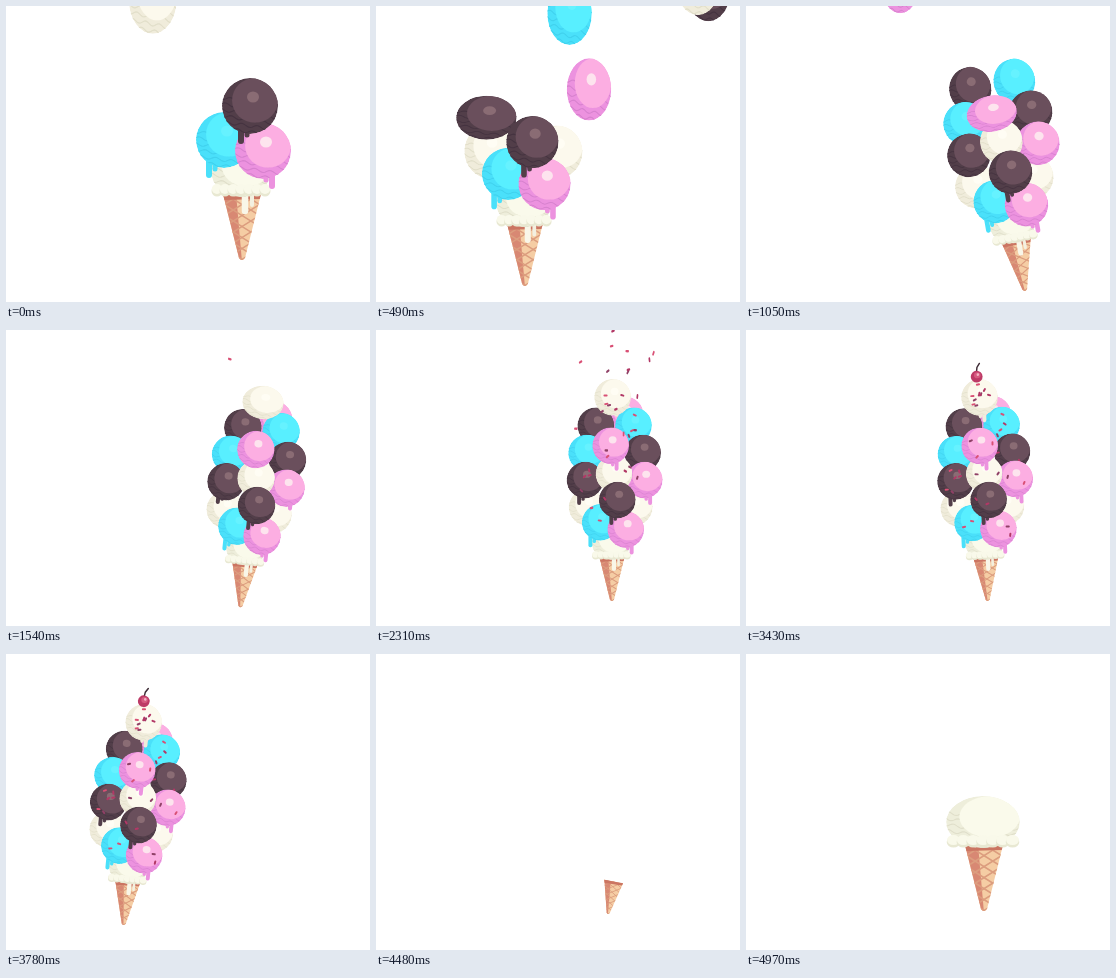
An HTML page with a canvas for the animation above (5.04 s loop, 364 by 296 pixels).

```html
<!DOCTYPE html>
<html lang="en">
<head>
<meta charset="utf-8">
<title>Ice cream tower</title>
<style>
html, body { margin: 0; width: 100%; height: 100%; overflow: hidden; background: #fff; }
canvas { display: block; }
</style>
</head>
<body>
<canvas id="stage" width="364" height="296"></canvas>
<script>
const ctx = document.getElementById('stage').getContext('2d');
const LOOP = 5040, STEP = 70, R = 28, TAU = Math.PI * 2, DEG = Math.PI / 180;
const { sin, cos, exp, min, max } = Math;

const FLAVOUR = {
  brown: { shade: '#523e49', light: '#6a4f5c', line: '#453340', glow: '#8a6c74', drip: -9 },
  pink: { shade: '#ec92df', light: '#fcaee2', line: '#d882cf', glow: '#fde4ee', drip: 9 },
  blue: { shade: '#4ae0fa', light: '#58efff', line: '#40d2ee', glow: '#66f2ff', drip: -15 },
  cream: { shade: '#f0ecdb', light: '#fcf9ed', line: '#e2dfca', glow: '#fffdf4', drip: 6 }
};

const ramp = (t, from, to) => min(max((t - from) / (to - from), 0), 1);
const ease = (t, from, to) => { const u = ramp(t, from, to); return u * u * (3 - 2 * u); };

// The cone sways on a balance, then leans back and dashes off to the left
function towerPose(t) {
  const turn = TAU * (t < 695 ? (t / 695) ** 2 / 2 : .5 + (t - 695) / 850);
  const calm = 1 - ease(t, 1300, 1800), dash = max(t - 3500, 0) / 420;
  const lean = -11.5 * cos(turn) * ease(t, 0, 1100) * calm;
  return {
    x: 236 - 87 * sin(turn) * calm + 6 * ease(t, 2900, 3500) - 280 * dash * dash,
    y: 254 + 31 * ease(t, 0, 660) - 14 * ease(t, 1300, 1750),
    s: 1 - .345 * ease(t, 0, 1750),
    r: (lean - 2.5 * ease(t, 2900, 3430) + 8 * ease(t, 3500, 3780)) * DEG
  };
}

// A small cone pops up and dips when the first scoop lands
function entryPose(t) {
  const u = ramp(t, 4480, 4620), back = 1 - u;
  return {
    x: 238 - 6 * back,
    y: 254 + 6 * back + 10 * sin(Math.PI * ramp(t, 4880, 4980)),
    s: 1 - .5 * back + .3 * u * back,
    r: 10 * back * DEG
  };
}

// Scoops from back to front, placed relative to the cone tip
const scoops = [];
const add = (kind, x, y, land) =>
  scoops.push({ ...FLAVOUR[kind], x, y, land, speed: .45 });
const sides = [['cream', 'cream'], ['brown', 'pink'], ['blue', 'brown'], ['brown', 'blue']];

add('pink', 20, -284, 1270);
for (const k of [0, 3, 2, 1]) for (const side of [1, 0]) {
  const half = 36 + 15 * k - 5.8 * k * k;
  add(sides[k][side], 4 - 6 * !k + (side ? half : -half), -143 - 41.5 * k, 300 + 88 * (2 * k + side));
}
['cream', 'pink'].forEach((kind, i) => add(kind, 3 - 5 * i, -194 - 43 * i, 810 + 230 * i));
const TOP = scoops.length, FRONT = TOP + 1;
add('cream', 1, -311, 1500);
add('blue', -18, -120, -9999);
add('pink', 21, -109, -9999);
add('brown', 8, -154, -9999);

const cherry = { x: -2, y: -343, land: 2980, speed: .45 };

let seed = 11;
const rand = () => (seed = seed * 16807 % 2147483647) / 2147483647;
const sprinkles = Array.from({ length: 40 }, (_, i) => {
  const host = i % 4 ? Math.floor(rand() * scoops.length) : TOP;
  const a = rand() * TAU, d = Math.sqrt(rand()) * 22;
  const dx = cos(a) * d, dy = sin(a) * d - 3;
  return {
    host, dx, dy, x: scoops[host].x + dx, y: scoops[host].y + dy,
    land: 2030 + rand() * 720, speed: .32, turn: rand() * TAU,
    color: ['#b23866', '#d95075', '#8f4066'][i % 3]
  };
});

function frame(x, y, r, sx, sy = sx) {
  ctx.setTransform(sx * cos(r), sx * sin(r), -sy * sin(r), sy * cos(r), x, y);
}

// Moves the pen to a part that drops straight down, then rides on the tower
function ride(part, t) {
  const d = t - part.land, { s, r } = towerPose(t), p = towerPose(max(t, part.land));
  const x = p.x + p.s * (part.x * cos(p.r) - part.y * sin(p.r));
  const y = p.y + p.s * (part.x * sin(p.r) + part.y * cos(p.r));
  if (d < 0) {
    frame(x, y + part.speed * d, 0, s * .85, s * 1.19);
  } else {
    const q = .18 * exp(-d / 130) * cos(d / 60);
    frame(x, y + q * R * s, r, s * (1 + q), s * (1 - q));
  }
}

function oval(x, y, rx, ry, color) {
  ctx.fillStyle = color;
  ctx.beginPath();
  ctx.ellipse(x, y, rx, ry, 0, 0, TAU);
  ctx.fill();
}

function line(color, width, ...pts) {
  ctx.strokeStyle = color;
  ctx.lineWidth = width;
  ctx.lineCap = 'round';
  ctx.beginPath();
  pts.forEach(([x, y]) => ctx.lineTo(x, y));
  ctx.stroke();
}

function poly(color, ...pts) {
  ctx.fillStyle = color;
  ctx.beginPath();
  pts.forEach(([x, y]) => ctx.lineTo(x, y));
  ctx.fill();
}

// Shaded ball with rippled dark side
function ball(x, y, rx, ry, c) {
  ctx.save();
  ctx.beginPath();
  ctx.ellipse(x, y, rx, ry, 0, 0, TAU);
  ctx.clip();
  oval(x, y, rx, ry, c.shade);
  for (let j = 0; j < 6; j++) {
    const pts = [];
    for (let i = -rx; i <= rx; i += 2)
      pts.push([x + i, y - 4 + j * 6 + i * .15 + 1.5 * sin(i / 2.5 + j * 2)]);
    line(c.line, 1.1, ...pts);
  }
  oval(x + rx * .18, y - ry * .2, rx * .82, ry * .8, c.light);
  ctx.restore();
}

function drawSprinkle(k, x, y) {
  const c = cos(k.turn) * 1.7, s = sin(k.turn) * 1.7;
  line(k.color, 3, [x - c, y - s], [x + c, y + s]);
}

function drawScoop(o, t) {
  ride(o, t);
  const grow = ramp(t, o.land + 250, o.land + 1250);
  if (grow) {
    line(o.shade, 6, [o.drip, 16], [o.drip, 16 + 19 * grow]);
    const x = o.drip - 6 * Math.sign(o.drip);
    line(o.shade, 5, [x, 16], [x, 16 + 13 * grow]);
  }
  ball(0, 0, R, R, o);
  oval(3, -9, 6, 5.5, o.glow);
}

function drawCone() {
  ctx.save();
  ctx.beginPath();
  ctx.moveTo(-19, -66);
  ctx.lineTo(19, -66);
  ctx.lineTo(3, -2);
  ctx.quadraticCurveTo(0, 2, -3, -2);
  ctx.clip();
  poly('#f5cda4', [-20, -67], [20, -67], [4, 2], [-4, 2]);
  poly('#d88873', [-20, -67], [-6, -67], [0, 2], [-4, 2]);
  for (let y = -90; y < 20; y += 11) {
    line('#dc9d7e', 1.6, [-20, y], [20, y + 25]);
    line('#dc9d7e', 1.6, [-20, y + 25], [20, y]);
  }
  poly('#cb7562', [-20, -67], [20, -67], [20, -61], [-20, -60]);
  ctx.restore();
}

function drawBase(wide, dripping) {
  if (dripping) {
    line('#f9f6e8', 6.5, [3, -68], [3, -49]);
    line('#f3f0e0', 4, [10, -68], [10, -55]);
  }
  ball(-1, -89, 30 * wide, 26, { shade: '#eeeedb', light: '#fafaeb', line: '#e0dfca' });
  for (let x = -24; x <= 24; x += 8) {
    oval(x * wide - 1, -69, 5.5 * wide, 5.5, '#e8e8d2');
    oval(x * wide - 1, -71, 5.2 * wide, 5, '#f9f9ea');
  }
}

function drawCherry(t) {
  ride(cherry, t);
  line('#3d2b35', 2.2, [0, -7], [1, -14], [5, -20]);
  oval(0, 0, 9, 9, '#bd3a66');
  oval(1, -2, 5, 4.5, '#d65a80');
  oval(2, -3, 2, 2, '#f3b3c4');
}

function drawTower(t) {
  const p = towerPose(t);
  frame(p.x, p.y, p.r, p.s);
  drawCone();
  scoops.forEach((o, i) => {
    if (i === FRONT) {
      frame(p.x, p.y, p.r, p.s);
      drawBase(1, true);
    }
    drawScoop(o, t);
    for (const k of sprinkles)
      if (k.host === i && t >= k.land) drawSprinkle(k, k.dx, k.dy);
  });
  drawCherry(t);
  for (const k of sprinkles) if (t < k.land) {
    ride(k, t);
    drawSprinkle(k, 0, 0);
  }
}

function drawEntry(t) {
  const p = entryPose(t), fall = t - 4880;
  frame(p.x, p.y, p.r, p.s);
  drawCone();
  if (fall < 0) frame(p.x, p.y + fall * .9, 0, 1, 1.12);
  if (fall > -260) drawBase(fall < 0 ? .92 : 1.23, false);
}

function draw(now) {
  const t = Math.floor((now + 2) / STEP) * STEP % LOOP;
  ctx.setTransform(1, 0, 0, 1, 0, 0);
  ctx.fillStyle = '#fff';
  ctx.fillRect(0, 0, 364, 296);
  if (t < 3990) drawTower(t);
  else if (t >= 4480) drawEntry(t);
  requestAnimationFrame(draw);
}
requestAnimationFrame(draw);
</script>
</body>
</html>
```
